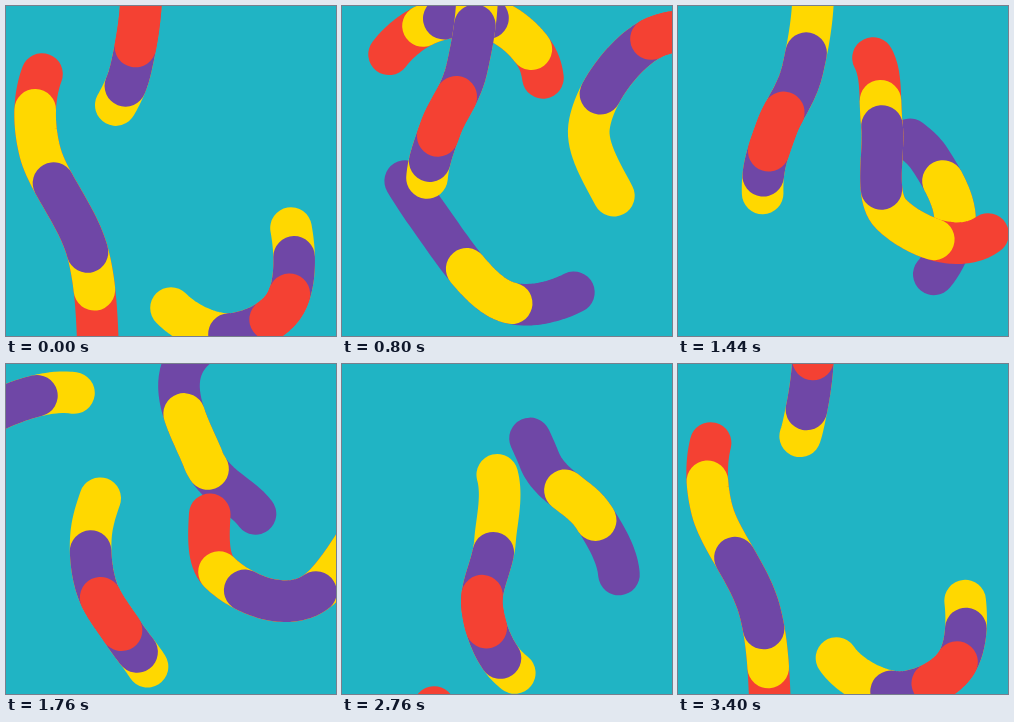
An HTML page for the animation above (3440 ms loop, 330x330 px).

```html
<!DOCTYPE html>
<html lang="en">
<head>
<meta charset="utf-8">
<title>Worms</title>
<style>
  html, body { margin: 0; width: 100%; height: 100%; overflow: hidden; background: #20b4c4; }
  svg { display: block; width: 100vw; height: 100vh; }
  path { fill: none; stroke-width: 41.6; stroke-linecap: round; stroke-linejoin: round; }
</style>
</head>
<body>
<svg id="stage" viewBox="0 0 330 330"></svg>
<script>
const RED = '#f44133', YELLOW = '#ffd800', PURPLE = '#6f47a6';
const LOOP = 3440, STEP = 40, TICKS = LOOP / STEP;
const SPACING = 6; // ticks of crawling between two track points
const svg = document.getElementById('stage');
const clamp = (v, lo, hi) => Math.min(Math.max(v, lo), hi);

// Catmull-Rom curve through evenly timed points, the first one reached at `start`.
function makeTrack(start, ...points) {
  const last = points.length - 1;
  const at = i => points[clamp(i, 0, last)];
  return u => {
    const v = clamp((u - start) / SPACING, 0, last);
    const i = Math.min(Math.floor(v), last - 1), x = v - i;
    return [0, 1].map(k => {
      const [a, b, c, d] = [-1, 0, 1, 2].map(n => at(i + n)[k]);
      return b + x / 2 * (c - a + x * (2 * a - 5 * b + 4 * c - d + x * (3 * (b - c) + d - a)));
    });
  };
}

// The jump back by one loop happens while the worm is out of sight.
const wrap = (t, at) => t < at ? t : t - TICKS;
const crawl = at => t => wrap(t, at);

// Eased moves from pose to pose, each given as [tick, place on the track].
const reach = (at, ...poses) => t => {
  const time = wrap(t, at);
  let place = poses[0][1];
  for (let i = 1; i < poses.length; i++) {
    const [t0, p0] = poses[i - 1], [t1, p1] = poses[i];
    const x = clamp((time - t0) / (t1 - t0), 0, 1);
    place += (p1 - p0) * x * x * (3 - 2 * x);
  }
  return place;
};

// Bands are nested strokes [colour, front lag, back lag], longest first.
const worms = [
  {
    head: reach(TICKS, [0, -9], [12, 26], [20, 31.7], [53, 0], [69, 11.4], [84, -9]),
    track: makeTrack(-12, [400, -100], [188, -14], [197, 95], [251, 152], [277, 217],
      [243, 280], [160, 294], [84, 207], [20, 100]),
    bands: [[PURPLE, 0, 12.7], [YELLOW, 5, 8.4]]
  },
  {
    head: crawl(62),
    track: makeTrack(-24, [93, 470], [93, 362], [81.5, 246], [34, 146], [36, 68], [81, 20],
      [146, 12], [195, 52], [204, 120], [213, 208], [310, 228], [410, 70]),
    bands: [[RED, 0, 18], [YELLOW, 3, 14], [PURPLE, 8, 12]]
  },
  {
    head: crawl(35),
    track: makeTrack(-54, [-130, 150], [-47, 66], [68, 29], [150, 98], [153, 177], [140, 242],
      [165, 302], [223, 328], [279, 298], [285, 222], [247, 121], [309, 33], [420, 25]),
    bands: [[YELLOW, 0, 18], [PURPLE, 2, 12], [RED, 5, 8]]
  },
  {
    head: reach(70, [-10.4, -28.5], [7.6, 4], [20, 0], [33, 0], [53, 28.7], [64, 45]),
    track: makeTrack(-24, [100, -150], [134, -37], [125, 62], [99, 121], [85, 172],
      [91, 225], [118, 270], [148, 315], [162, 375]),
    bands: [[YELLOW, 0, 21], [PURPLE, 2, 14.8], [RED, 5, 9.4]]
  }
];

for (const worm of worms) {
  worm.paths = worm.bands.map(([colour]) => {
    const path = document.createElementNS('http://www.w3.org/2000/svg', 'path');
    path.setAttribute('stroke', colour);
    svg.appendChild(path);
    return path;
  });
}

function trace(track, from, to) {
  const count = Math.ceil((to - from) * 4);
  const points = [];
  for (let i = 0; i <= count; i++) {
    const [x, y] = track(from + (to - from) * i / count);
    points.push(x.toFixed(2) + ' ' + y.toFixed(2));
  }
  return 'M' + points.join('L');
}

function draw(ms) {
  const t = Math.floor(ms % LOOP / STEP);
  for (const { head, track, bands, paths } of worms) {
    const u = head(t);
    bands.forEach(([, front, back], i) => paths[i].setAttribute('d', trace(track, u - back, u - front)));
  }
}

function tick() {
  draw(performance.now());
  requestAnimationFrame(tick);
}
tick();
</script>
</body>
</html>
```
